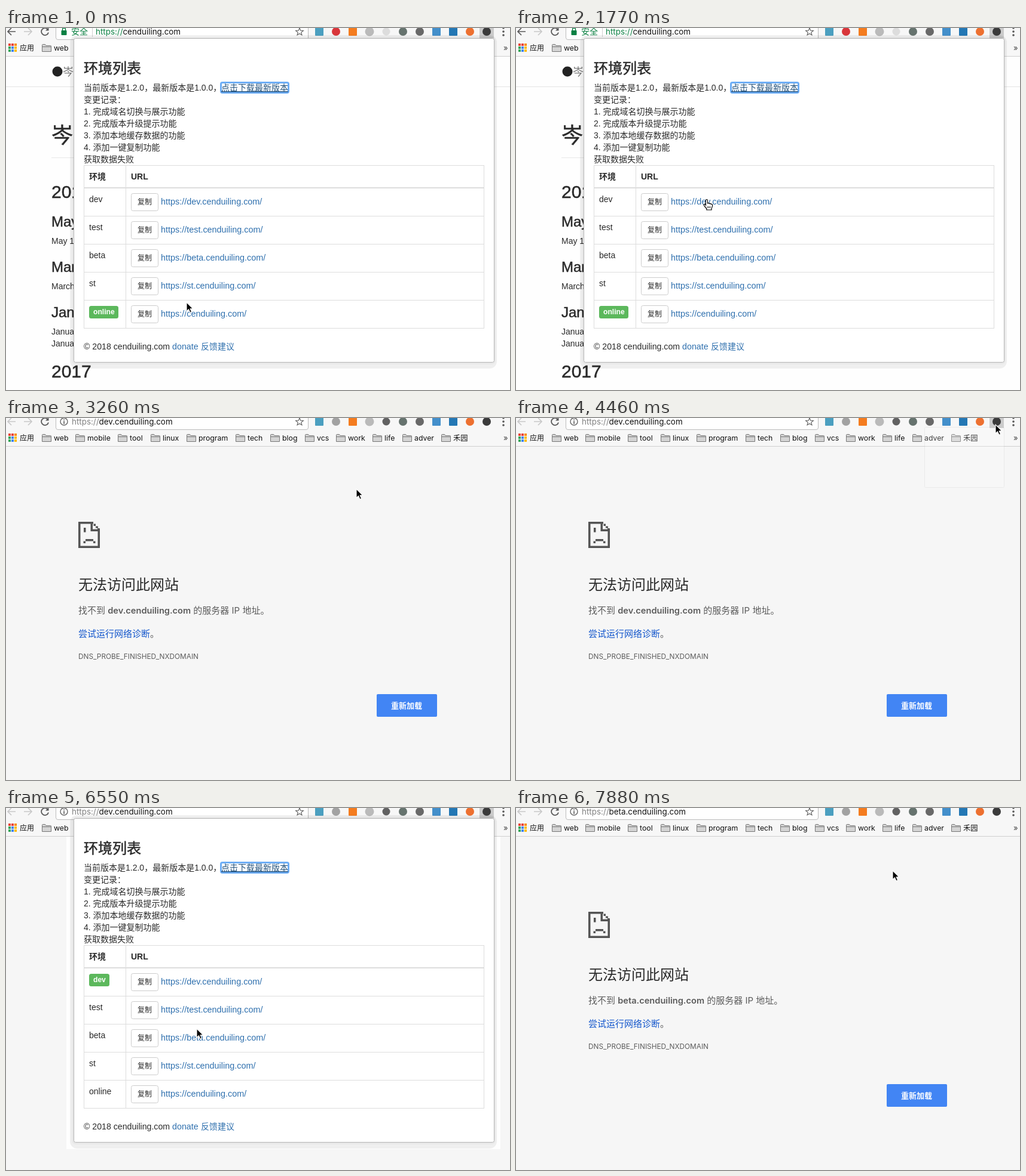
An HTML page for the animation above (8000 ms loop, 843 by 607 pixels).

```html
<!DOCTYPE html>
<html lang="zh">
<head>
<meta charset="utf-8">
<title>环境列表</title>
<style>
html, body { margin: 0; width: 100%; height: 100%; overflow: hidden; background: #fff; }
svg { display: block; width: 100%; height: 100%; }
text { white-space: pre; font: 14px "Liberation Sans", "Noto Sans CJK SC", "Noto Sans CJK", sans-serif; fill: #2a2a2a; }
.ui text, text.ui { font-family: Inter, "Noto Sans CJK SC", "Noto Sans CJK", sans-serif; }
text.head { stroke: #2a2a2a; stroke-width: .5px; }
</style>
</head>
<body>
<svg id="stage" viewBox="0 0 843 607" preserveAspectRatio="none"></svg>
<script>
const LOOP = 8000, STEP = 148.8, LEAD = 22;
const DOMAIN = 'cenduiling.com';
const GREEN = '#5cb85c', LINK = '#2f70ae', ACTIVE = '#23527c';

// name, right end of its link
const ROWS = [['dev', 429], ['test', 430], ['beta', 435], ['st', 418], ['online', 403]];
const host = i => (i < 4 ? ROWS[i][0] + '.' : '') + DOMAIN;
const linkY = i => 291 + 47 * i;

// pointer path: step, x, y
const PATH = [
  [0, 302, 460], [6, 318, 340], [7, 318, 340], [11, 319, 308], [12, 319, 288],
  [13, 319, 291], [16, 319, 291], [17, 340, 278], [22, 586, 119], [28, 801, 11],
  [30, 802, 11], [32, 567, 102], [37, 152, 265], [39, 175, 280], [42, 290, 338],
  [43, 312, 358], [44, 319, 370], [45, 320, 377], [48, 321, 380], [51, 321, 380], [53, 630, 105]
];

const rect = (x, y, w, h, fill, more = '') =>
  `<rect x="${x}" y="${y}" width="${w}" height="${h}" fill="${fill}" ${more}/>`;
const disc = (x, y, r, fill) => `<circle cx="${x}" cy="${y}" r="${r}" fill="${fill}"/>`;
const path = (d, stroke, w = 1, fill = 'none') =>
  `<path d="${d}" fill="${fill}" stroke="${stroke}" stroke-width="${w}"/>`;
const text = (x, y, s, style = '', cls = '') =>
  `<text x="${x}" y="${y}" class="${cls}" style="${style}">${s}</text>`;
const group = (id, body, cls = '') => `<g id="${id}" class="${cls}">${body}</g>`;

function homePage() {
  const heads = [[285, '2018', 30], [333, 'May', 24], [409, 'March', 24], [485, 'January', 24], [586, '2017', 30]];
  const lines = [[362, 'May 1'], [438, 'March'], [514, 'Janua'], [534, 'Janua']];
  return rect(0, 48, 843, 559, '#fefefe') + rect(0, 98, 843, 1, '#e4e4e4') +
    disc(86, 73, 8.5, '#222') + text(95, 80, '岑', 'font-size:18px;fill:#777') +
    text(76, 193, '岑', 'font-size:36px', 'head') + rect(76, 217, 690, 1, '#e8e8e8') +
    heads.map(([y, s, size]) => text(76, y, s, `font-size:${size}px`, 'head')).join('') +
    lines.map(([y, s]) => text(76, y, s)).join('');
}

function errorPage() {
  const sheet = 'M121 174H146V177.5H150V181.5H154V185H157V218H121ZM124.5 177.5V214.5H153.5V190H141.5V177.5Z' +
    'M145 177.5H146.5V181H150V184.5H153V186.5H145Z';
  const face = 'M130 184H133.5V191.5H130ZM133 203H146V206.5H133ZM129.5 206.5H133V210H129.5ZM146 206.5H149.5V210H146Z';
  return rect(0, 48, 843, 559, '#f6f6f6') +
    `<path d="${sheet + face}" fill="#545454" fill-rule="evenodd"/>` +
    text(121, 288, '无法访问此网站', 'font-size:24px') +
    '<text id="lost" class="ui" x="121" y="328" style="font-size:15px;fill:#5c5c5c"></text>' +
    text(121, 367, '<tspan fill="#15c">尝试运行网络诊断</tspan>。', 'font-size:15px;fill:#5c5c5c') +
    text(121, 404, 'DNS_PROBE_FINISHED_NXDOMAIN', 'font-size:11.85px;fill:#5c5c5c', 'ui') +
    rect(620, 463, 101, 38, '#4285f4', 'rx="2"') +
    text(644, 487, '重新加载', 'font-size:13px;font-weight:bold;fill:#fff');
}

function toolbar() {
  const marks = [[60, 'web'], [116, 'mobile'], [187, 'tool'], [242, 'linux'], [302, 'program'], [384, 'tech'],
    [442, 'blog'], [500, 'vcs'], [552, 'work'], [613, 'life'], [663, 'adver'], [728, '禾园']];
  const folder = x => path(`M${x + .5} 39.5V28.5Q${x + .5} 27.5 ${x + 1.5} 27.5H${x + 5.5}L${x + 7} 29.5H${x + 14.5}` +
    `Q${x + 15.5} 29.5 ${x + 15.5} 30.5V39.5ZM${x + .5} 31.5H${x + 15.5}`, '#777', 1, '#d4d4d4');
  const dots = ['#ea4335', '#ea4335', '#fb8c00', '#34a853', '#4285f4', '#fbbc05', '#34a853', '#4285f4', '#fbbc05'];
  const star = Array.from({ length: 10 }, (_, i) => {
    const a = i * Math.PI / 5 - Math.PI / 2, r = i % 2 ? 2.9 : 6.6;
    return `${i ? 'L' : 'M'}${(491 + r * Math.cos(a)).toFixed(1)} ${(6.5 + r * Math.sin(a)).toFixed(1)}`;
  }).join('') + 'Z';
  const addon = (x, fill, square) => square ? rect(x - 7, -1, 14, 14, fill, 'rx="1"') : disc(x, 6, 7, fill);
  return rect(0, 0, 843, 48, '#f7f7f7') + rect(0, 47, 843, 1, '#cfcfcf') +
    '<path id="back" d="M16 6H3M9 0L3 6L9 12" fill="none" stroke-width="1.7"/>' +
    path('M30 6H43M37 0L43 6L37 12', '#c9c9c9', 1.7) +
    path('M70 2.5A6 6 0 1 0 71 7.5', '#5a5a5a', 1.8) + path('M71.5 -1V4.5H66Z', 'none', 0, '#5a5a5a') +
    rect(83.5, -8.5, 422, 28, '#fff', 'rx="3.5" stroke="#bcbcbc"') +
    group('secure', rect(92.5, 4, 9, 8, '#0b8043', 'rx="1"') + path('M94.5 5V2.5A2.5 2.5 0 0 1 99.5 2.5V5', '#0b8043', 1.5) +
      text(109, 11, '安全', 'font-size:14px;fill:#0b8043') + rect(144, -2, 1, 17, '#d0d0d0')) +
    group('info', '<circle cx="97" cy="6" r="6" fill="none" stroke="#666" stroke-width="1.4"/>' +
      rect(96.2, 5, 1.7, 5, '#666') + rect(96.2, 2.3, 1.7, 1.7, '#666')) +
    '<text id="url" y="11" style="font-size:13.4px"></text>' +
    path(star, '#666', 1.2) +
    rect(792, 0, 24, 17, '#cbcbcb', 'id="lit"') +
    addon(524, '#4b9fc0', true) + '<circle id="tool1" cx="552" cy="6" r="7"/>' + addon(580, '#f47c1f', true) +
    '<circle id="tool2" cx="608" cy="6" r="7.5"/><circle id="tool3" cx="636" cy="6" r="6.5"/>' +
    addon(664, '#66736e') + addon(692, '#686868') + addon(720, '#438fcb', true) +
    addon(748, '#2377b4', true) + addon(776, '#ed7030') + addon(804, '#3b3b3b') +
    [0, 6, 12].map(y => disc(832, y, 1.8, '#555')).join('') +
    dots.map((c, i) => rect(4 + i % 3 * 5, 26 + (i / 3 | 0) * 5, 4, 4, c)).join('') +
    text(23, 38, '应用', 'font-size:12px;fill:#111') +
    marks.map(([x, s]) => folder(x) + text(x + 20, 38, s, 'font-size:12.3px;fill:#111')).join('') +
    text(832, 38, '»', 'font-size:13px;fill:#444');
}

function popup() {
  const log = ['变更记录：', '1. 完成域名切换与展示功能', '2. 完成版本升级提示功能',
    '3. 添加本地缓存数据的功能', '4. 添加一键复制功能', '获取数据失败'];
  const row = ([name], i) => {
    const y = 47 * i, wide = name === 'online' ? 49 : 34;
    return group('plain' + i, text(139, 292 + y, name)) +
      group('badge' + i, rect(139, 278 + y, wide, 21, GREEN, 'rx="3.5"') +
        text(146, 292 + y, name, 'font-size:12.1px;font-weight:bold;fill:#fff')) +
      rect(209.5, 277.5 + y, 45, 29, '#fff', 'rx="3" stroke="#ccc"') +
      text(220, 296 + y, '复制', 'font-size:12px') +
      `<text id="link${i}" x="259" y="${296 + y}" style="font-size:14.4px">https://${host(i)}/</text>` +
      rect(130, 315 + y, 670, 1, '#ddd');
  };
  return rect(107, 12, 714, 559, '#000', 'rx="12" opacity=".06"') +
    rect(110, 15, 709, 549, '#000', 'rx="7" opacity=".03"') +
    rect(113.5, 17.5, 703, 543, '#fff', 'rx="3" stroke="#b4b4b4"') +
    text(130, 76, '环境列表', 'font-size:24px', 'head') +
    text(130, 105, '当前版本是1.2.0，最新版本是1.0.0，') +
    '<rect id="ring" fill="none" rx="2.5" stroke="#5fa6f6" stroke-width="3" stroke-opacity=".9"/>' +
    '<text id="get" x="360" y="105">点击下载最新版本</text>' +
    log.map((s, i) => text(130, 125 + 20 * i, s)).join('') +
    rect(130, 230, 670, 1, '#ddd') + rect(130, 267, 670, 2, '#ddd') +
    [130, 200, 799].map(x => rect(x, 230, 1, 274, '#ddd')).join('') +
    text(139, 254, '环境', 'font-weight:bold') + text(209, 254, 'URL', 'font-weight:bold') +
    ROWS.map(row).join('') +
    text(130, 539, '© 2018 ' + DOMAIN, 'font-size:14.15px') +
    text(278, 539, 'donate', `font-size:14.3px;fill:${LINK}`) + text(326, 539, '反馈建议', `fill:${LINK}`);
}

const arrow = '<path id="arrow" d="M0 0V15L3.5 11.7L6 17.3L8.6 16.2L6.2 10.8H10.8Z" fill="#000" stroke="#fff" stroke-width="1.1"/>';
const hand = group('hand', path('M-1.6 9V1.2Q-1.6 -.5 0 -.5Q1.5 -.5 1.5 1.2V6Q3.6 4.8 4.4 6.6Q6.6 5.6 7.2 7.5Q9.8 7 9.6 9.5' +
  'Q9.6 12 8 14.5V17H-.2V15Q-2.6 12.5 -4.6 9.4Q-5.2 7.4 -3.4 7.3Q-2.4 7.6 -1.6 9Z', '#000', 1.2, '#fff') +
  path('M1.2 11V14M3.5 11V14M5.8 11V14', '#000', .9));

const stage = document.getElementById('stage');
stage.innerHTML = rect(0, 0, 843, 607, '#fefefe') + group('home', homePage()) + group('error', errorPage()) +
  rect(101, 48, 726, 524, '#fefefe', 'id="patch"') + group('bar', toolbar(), 'ui') +
  rect(683.5, 15.5, 133, 101, '#fff', 'id="bud" rx="2" stroke="#bbb" opacity=".2"') +
  group('popup', popup()) + group('pointer', arrow + hand);

const el = id => document.getElementById(id);
const show = (id, on) => el(id).setAttribute('display', on ? 'inline' : 'none');
const set = (id, attrs) => Object.entries(attrs).forEach(([k, v]) => el(id).setAttribute(k, v));
const within = (k, a, b) => k >= a && k <= b;

function pointerAt(k) {
  const i = PATH.findIndex(p => p[0] >= k);
  if (i < 1) return PATH[0].slice(1);
  const [a, x, y] = PATH[i - 1], [b, u, v] = PATH[i], f = (k - a) / (b - a);
  return [Math.round(x + (u - x) * f), Math.round(y + (v - y) * f)];
}
const linkAt = ([x, y]) => ROWS.findIndex((r, i) => within(x, 259, r[1]) && within(y, linkY(i) - 9, linkY(i) + 8));

function styleLink(id, on) {
  el(id).style.fill = on ? ACTIVE : LINK;
  el(id).style.textDecoration = on ? 'underline' : 'none';
}

function draw(t) {
  const k = Math.min(53, Math.floor((t + LEAD) / STEP));
  const home = k < 15, env = k < 50 ? 0 : 2;
  const failed = within(k, 18, 49) || k === 53;
  const open = k <= 16 || within(k, 31, 51);
  const fading = k === 16 || k === 51;

  show('home', home);
  show('error', failed);
  show('patch', within(k, 31, 49));
  show('bud', k === 30);
  show('lit', open || k === 30);
  show('secure', home);
  show('info', !home);
  set('back', { stroke: home ? '#5a5a5a' : '#c9c9c9' });
  set('tool1', { fill: home ? '#d9363a' : '#a2a2a2' });
  set('tool2', { fill: home || failed ? '#bababa' : '#c70d0d' });
  set('tool3', { fill: home ? '#dddddd' : '#626262' });
  set('url', { x: home ? 150 : 110 });
  el('url').innerHTML = `<tspan fill="${home ? '#0b8043' : '#808080'}">https://</tspan>` +
    `<tspan fill="#111">${home ? DOMAIN : host(env)}</tspan>`;
  el('lost').innerHTML = `找不到 <tspan style="font-weight:600;font-size:14.6px">${host(env)}</tspan> 的服务器 IP 地址。`;

  show('popup', open);
  set('popup', { opacity: fading ? .1 : 1 });
  const now = k < 17 ? 4 : 0;
  ROWS.forEach((r, i) => {
    show('plain' + i, i !== now);
    show('badge' + i, i === now);
  });

  // hover style trails the pointer by one step
  const at = pointerAt(k), over = open ? linkAt(at) : -1;
  const hover = linkAt(pointerAt(Math.max(0, k - 1)));
  const picked = within(k, 14, 16) ? 0 : within(k, 47, 51) ? 2 : -1;
  ROWS.forEach((r, i) => styleLink('link' + i, i === hover || i === picked));
  styleLink('get', picked < 0);
  show('ring', !fading);
  set('ring', picked < 0 ? { x: 359.5, y: 91.5, width: 113, height: 17 }
    : { x: 258, y: linkY(picked) - 9, width: ROWS[picked][1] - 257, height: 18 });

  set('pointer', { transform: `translate(${at})` });
  show('hand', over >= 0);
  show('arrow', over < 0);
}

const start = performance.now();
function tick() {
  draw((performance.now() - start) % LOOP);
  requestAnimationFrame(tick);
}
tick();
</script>
</body>
</html>
```
